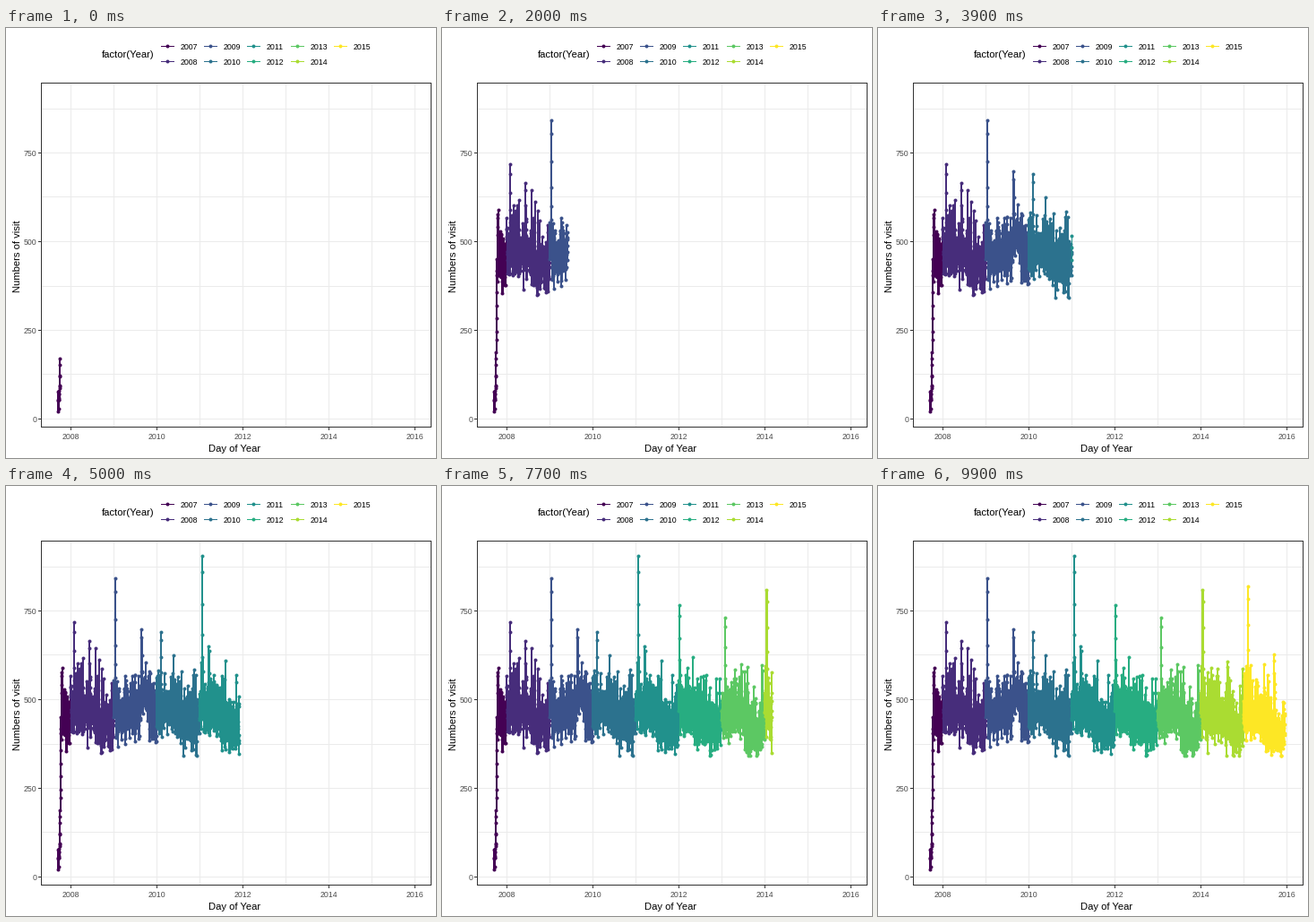
Animation, 480 px wide and 480 px high, one loop 10000 ms. Source, as a matplotlib script:

```python
import numpy as np
import matplotlib.pyplot as plt
from matplotlib.animation import FuncAnimation
from matplotlib.patches import Rectangle

PX = 0.75  # points per pixel at 96 dpi
FRAMES = 100
START, END = 2007.71, 2015.96
LEFT, RIGHT, TOP, BOTTOM = 39, 474, 61, 445
YEARS = range(2007, 2016)
COLORS = plt.get_cmap("viridis")(np.linspace(0, 255, len(YEARS)).round().astype(int))

plt.rcParams["font.family"] = "Liberation Sans"

# Date and height of the main peaks
PEAKS = [(2007.79, 577), (2008.08, 716), (2008.44, 665), (2009.03, 842),
         (2009.65, 698), (2010.10, 690), (2011.06, 903), (2012.02, 764),
         (2013.08, 731), (2014.05, 809), (2014.63, 605), (2015.10, 819),
         (2015.71, 625)]


def px(t):
    return np.round(72 + 48 * (t - 2008))


def py(v):
    return np.round(436 - 0.396 * v)


def bump(t, centre, width):
    return np.exp(-((t - centre) / width) ** 2)


def make_visits():
    rng = np.random.default_rng(7)
    t = np.arange(START, END, 1 / 365.25)

    # Slow decline, yearly season, a lift each January and one busy autumn
    v = 462 - 3 * (t - 2008) + 25 * np.cos(2 * np.pi * (t - 0.3))
    v += 45 * np.exp(-(t % 1) / 0.06) + 90 * bump(t, 2009.73, 0.13)
    v += rng.normal(0, 26, t.size) + rng.gumbel(-16, 27, t.size)
    v = np.maximum(v, 340)

    # Uneven climb through the first weeks
    d = np.arange(26)
    v[:26] = 20 + 430 * (d / 25) ** 3 + 60 * (1 - d / 25) * abs(np.sin(1.9 * d))

    k = np.arange(6)
    for date, top in PEAKS:
        i = np.searchsorted(t, date)
        v[i:i + k.size] = 460 + (top - 460) / (1 + (k / 3) ** 2)
    return t, v


fig = plt.figure(figsize=(5, 5), dpi=96, facecolor="white")
ax = fig.add_axes([0, 0, 1, 1])
# Whole numbers fall on pixel centres
ax.set(xlim=(-0.49, 479.51), ylim=(479.51, -0.49))
ax.axis("off")


def rule(xs, ys, color):
    ax.plot(xs, ys, color=color, lw=PX, antialiased=False, zorder=1,
            solid_capstyle="butt")


def label(x, y, s, size=8.8, color="black", **kw):
    ax.text(x, y, s, fontsize=size * PX, color=color, **kw)


def series(xs, ys, color):
    return ax.plot(xs, ys, color=color, lw=PX, marker="o", ms=4 * PX, mew=0,
                   antialiased=False, zorder=3)[0]


for year in range(2008, 2017):
    x = px(year)
    rule([x, x], [TOP, BOTTOM], "#EBEBEB")
    if year % 2 == 0:
        rule([x, x], [BOTTOM, BOTTOM + 3], "#333333")
        label(x, 458.5, year, color="#4D4D4D", ha="center")

for value in range(0, 876, 125):
    y = py(value)
    rule([LEFT, RIGHT], [y, y], "#EBEBEB")
    if value % 250 == 0:
        rule([LEFT - 3, LEFT], [y, y], "#333333")
        label(34, y + 3.5, value, color="#4D4D4D", ha="right")

ax.add_patch(Rectangle((LEFT, TOP), RIGHT - LEFT, BOTTOM - TOP, fill=False,
                       ec="#333333", lw=PX, antialiased=False, zorder=5))

label(255, 472.5, "Day of Year", 11.3, ha="center")
label(12.5, 254, "Numbers of visit", 11.2, rotation=90, ha="center", va="center")
label(106, 33, "factor(Year)", 11.3)

for i, (year, color) in enumerate(zip(YEARS, COLORS)):
    x, y = round(180 + 48.2 * (i // 2)), 20 + 17 * (i % 2)
    rule([x - 7, x + 7], [y, y], color)
    series([x], [y], color)
    label(x + 14, y + 3.5, year)

dates, visits = make_visits()
xs, ys = px(dates), py(visits)
lines = [series([], [], c) for c in COLORS]


def update(n):
    shown = dates <= 2007.757 + n / 12
    for year, line in zip(YEARS, lines):
        pick = shown & (np.floor(dates) == year)
        line.set_data(xs[pick], ys[pick])
    return lines


anim = FuncAnimation(fig, update, frames=FRAMES, interval=100, repeat=True,
                     repeat_delay=0, blit=False)
plt.show()
```
